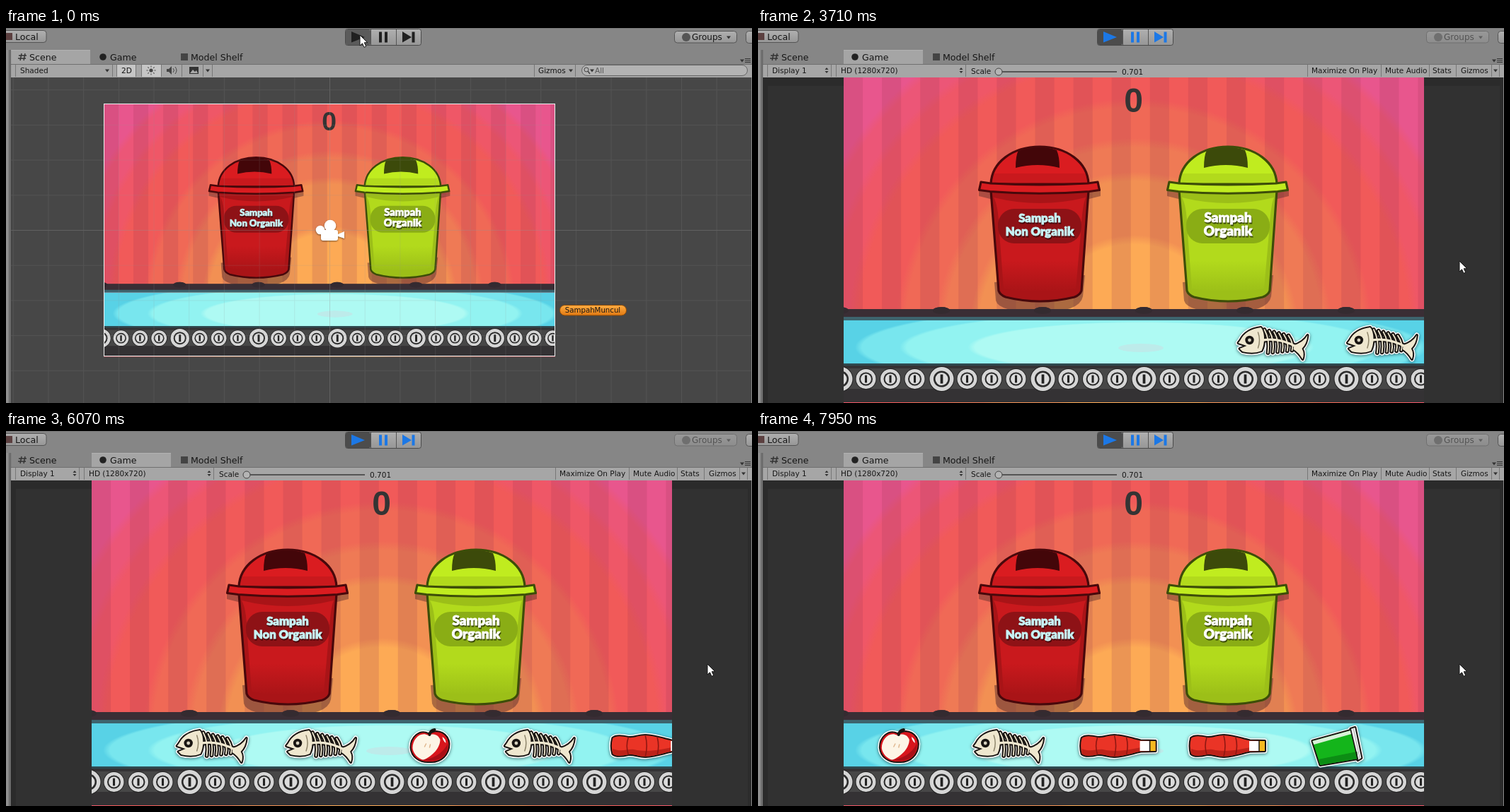
Write an HTML page that moves like this. It is 1054 px wide and 531 px high and loops after 8000 ms.

```html
<!DOCTYPE html>
<html lang="id">
<head>
<meta charset="utf-8">
<title>Sorting game in an editor</title>
<style>
  html, body { margin: 0; width: 100%; height: 100%; overflow: hidden; background: #868686; }
  svg { display: block; width: 1054px; height: 531px; }
  text { font-family: "DejaVu Sans", sans-serif; font-size: 10.5px; fill: #161616; white-space: pre; }
  .tab { font-size: 12.6px; }
  .label { font-family: Lato, sans-serif; font-weight: 900; text-anchor: middle; }
  .score { font: bold 48px "Liberation Sans", Arial, sans-serif; fill: #343434; text-anchor: middle; }
  .item { filter: drop-shadow(0 1px 2px rgba(0, 30, 40, .6)); }
</style>
</head>
<body>
<svg id="stage" viewBox="0 0 1054 531" xmlns="http://www.w3.org/2000/svg"></svg>
<script>
const rect = (x, y, w, h, fill, more = '') =>
  `<rect x="${x}" y="${y}" width="${w}" height="${h}" fill="${fill}" ${more}/>`;
const path = (d, fill, more = '') => `<path d="${d}" fill="${fill}" ${more}/>`;
const disc = (x, y, r, fill, more = '') => `<circle cx="${x}" cy="${y}" r="${r}" fill="${fill}" ${more}/>`;
const text = (x, y, s, more = '') => `<text x="${x}" y="${y}" ${more}>${s}</text>`;
const line = (d, color, w = 1) => path(d, 'none', `stroke="${color}" stroke-width="${w}"`);
const repeat = (n, f) => Array.from({ length: n }, (_, i) => f(i)).join('');

// Radial gradient in nearly flat rings
function rings(id, place, list) {
  let stops = '';
  list.forEach(([r, color], i) => {
    const from = i ? list[i - 1][0] + .012 : 0;
    stops += `<stop offset="${from}" stop-color="${color}"/><stop offset="${r - .012}" stop-color="${color}"/>`;
  });
  return `<radialGradient id="${id}" gradientUnits="userSpaceOnUse" cx="0" cy="0" r="1" gradientTransform="${place}">${stops}</radialGradient>`;
}

const fade = (id, ...colors) => `<linearGradient id="${id}" x2="0" y2="1">${colors.map((c, i) =>
  `<stop offset="${i / (colors.length - 1)}" stop-color="${c}"/>`).join('')}</linearGradient>`;

// ---- Game picture, in the coordinates of the large view ----

function bin(dx, c, label) {
  const body = 'M329 230 L340 372 Q342 378 350 381 Q398 393 447 381 Q455 378 457 372 L467 230Z';
  const dome = 'M329 221 C330 190 360 168 398 168 S466 190 467 221Z';
  const rim = 'M315 218 L329 220 Q398 224 466 220 L480 218 L482.500 229.500 L468 231.500 Q398 237 328 231.500 L312.500 229.500Z';
  const edge = `stroke="${c.edge}" stroke-width="3.2" stroke-linejoin="round"`;
  return `<g transform="translate(${dx} 0)">
    ${path('M334 360 L336 386 Q340 402 398 403 Q455 402 459 380 L462 350Z', '#5a2c2c', 'opacity=".5"')}
    ${path('M312 230 h172 v8 l-16 4 h-140 l-16 -4Z', '#5a2c2c', 'opacity=".45"')}
    ${path(body, c.dark)}
    ${path('M333 240 Q398 256 463 240 Q458 252 456 290 L449 369 Q398 379 347 369 L341 290 Q340 252 333 240Z', `url(#${c.name})`)}
    ${path(body, 'none', edge)}
    ${path(dome, c.lid)}
    ${path('M331 206 H465 L467 221 H329Z', c.body)}
    ${path('M364 198 Q364 181 368 173 Q398 164 422 173 Q426 182 426 198 Q395 190 364 198Z', c.slot)}
    ${path(dome, 'none', edge)}
    ${path(rim, c.lid, edge)}
    ${rect(339, 256, 118, 49, c.plate, 'rx="23"')}
    ${[[1, 2, c.edge], [0, 0, c.ink]].map(([x, y, fill]) => label.map((s, i) =>
      text(398 + x, 274.5 + i * 19.5 + y, s, `class="label" style="fill:${fill};font-size:${c.size}px" stroke="${fill}" stroke-width=".9"`)).join('')).join('')}
  </g>`;
}

const red = { name: 'red', edge: '#48080b', lid: '#da1c20', body: '#c9191d', dark: '#a91417', slot: '#430609', plate: '#8e1216', ink: '#c8f3f5', size: 16.7 };
const green = { name: 'green', edge: '#3d4d09', lid: '#c0ec1f', body: '#b2da1c', dark: '#9cbf18', slot: '#3c4a0a', plate: '#8aad15', ink: '#ffffff', size: 18.8 };

function roller(x, r) {
  return disc(x, 497, r + 1, '#232323') + disc(x, 497, r, '#d6d6d6') + disc(x, 497, r * .68, '#2c2c2c')
    + disc(x, 497, r * .53, '#dcdcdc') + rect(x - r * .11, 497 - r * .38, r * .22, r * .76, '#222');
}

const art = `<g id="art">
  ${rect(121, 70, 820, 461, 'url(#glow)')}
  ${repeat(16, i => rect(121 + i * 54.1, 70, Math.min(27.05, 820 - i * 54.1), 330, '#8c3050', 'opacity=".17"'))}
  ${text(530.7, 119.4, '0', 'class="score"')}
  ${repeat(6, i => `<ellipse cx="${116 + i * 143}" cy="400" rx="12" ry="5" fill="#362b32"/>`)}
  ${bin(0, red, ['Sampah', 'Non Organik'])}
  ${bin(266, green, ['Sampah', 'Organik'])}
  ${rect(121, 398, 820, 12, '#3a2e35')}
  ${repeat(6, i => `<ellipse cx="${116 + i * 143}" cy="400" rx="12" ry="5" fill="#332a30" opacity=".8"/>`)}
  ${rect(121, 409, 820, 5, '#3d646e')}
  ${rect(121, 414, 820, 62, 'url(#water)')}
  <ellipse cx="541" cy="453" rx="32" ry="6" fill="#bdebea"/>
  ${rect(121, 475, 820, 55, '#343234')}
  ${rect(121, 475, 820, 3, '#2f4a50')}
  ${rect(121, 482, 820, 29, '#474747')}
  ${repeat(6, i => roller(116.5 + i * 143, 17) + [36, 70.5, 105].map(d => roller(116.5 + i * 143 + d, 14)).join(''))}
</g>`;

// ---- Things on the belt, centred on 0,0 ----

// Each part is [d, stroke width, fill]; drawn as white rim, dark outline, then colour.
function sticker(id, parts, extra = '') {
  const pass = (grow, color) => parts.map(([d, w, solid]) =>
    path(d, solid ? color || solid : 'none', `stroke="${color || (solid ? 'none' : '#efe7cf')}" stroke-width="${w + grow}"`)).join('');
  return `<g id="${id}" stroke-linejoin="round" stroke-linecap="round">${pass(7, '#fff')}${pass(4, '#191512')}${pass(0, '')}${extra}</g>`;
}

const ribs = repeat(6, i => {
  const x = -9 + i * 6.8, h = 16 - i * 1.7;
  return `M${x - 3} ${-3 - h} Q${x + 5} ${-4 + i} ${x + 2} ${h - 2 + i}`;
});
const tail = 'M30 3 Q43 -1 49 -11 Q48 1 41 8 Q45 15 42 23 Q36 13 29 9Z';
const head = 'M-49 0 L-46 -4 C-41 -14 -32 -20 -17 -22 C-11 -16 -11 2 -16 11 C-25 15 -35 14 -43 12 L-47 8 L-37 4 Q-43 2 -49 0Z';
const bottle = 'M-51 -11 C-47 -15 -37 -14 -29 -12 C-21 -11 -15 -15 -5 -15 C11 -14 20 -10 32 -7.500 L53 -7 L53 7 L32 7.500 C20 10 11 14 -5 15 C-15 15 -21 11 -29 12 C-37 14 -47 15 -51 11 Q-54 0 -51 -11Z';

const goods = [
  sticker('fish', [[ribs, 1.8], ['M-14 -4 Q10 -8 34 6', 3.4], [tail, 0, '#efe7cf'], [head, 0, '#efe7cf']],
    disc(-33, -4, 6.2, '#191512') + disc(-33, -4, 2.4, '#d8d2c0') + line('M-21 -15 Q-17 -4 -21 7', '#8f866c', 1.5)),
  sticker('apple', [['M-3 -17 C-15 -23 -27 -12 -27 2 C-26 15 -15 23 -1 22 C15 23 26 12 26 -3 C25 -17 11 -23 2 -18Z', 0, '#d8161c']],
    path('M-3 -15 C-14 -21 -25 -10 -25 3 C-24 11 -18 17 -10 20 C4 14 14 2 14 -9 C11 -17 3 -18 -3 -15Z', '#fdf5e6')
    + path('M-14 20 Q14 18 25 -4 Q25 20 0 21Z', '#a90f16')
    + path('M17 -13 Q22 -10 22 -4 Q18 -7 17 -13Z', '#fff')
    + line('M-1 -16 Q0 -22 6 -23', '#191512', 4) + line('M-6 -3 l-2 4 M0 -2 l-1 4', '#e0b890', 1.5)),
  sticker('bottle', [[bottle, 0, '#ea3426']],
    path('M-51 4 C-39 9 -31 4 -21 5 C1 10 20 4 32 2 L32 7.500 C20 10 11 14 -5 15 C-15 15 -21 11 -29 12 C-37 14 -47 15 -51 11Z', '#bd2219')
    + line('M-29 -12 Q-33 0 -29 12 M-5 -15 Q-1 0 -5 15 M12 -12 Q15 0 12 12', '#8e1712', 1.6)
    + rect(31, -7, 14, 14, '#fff') + rect(45, -7, 8, 14, '#f5b91f') + line('M45 -7 V7', '#191512', 1.5)),
  sticker('cup', [['M-34 -7 L20 -22 L30 18 L-23 27Z', 0, '#14b51b'], ['M20 -24 L26 -26 L35 17 L30 20Z', 0, '#f2f2f2']],
    path('M-26 19 L29 8 L30 18 L-23 27Z', '#0c8d14') + path('M-34 -7 L20 -22 L21 -17 L-32 -2Z', '#d9f0d9')
    + line('M20 -23 L30 19', '#191512', 1.6) + line('M24 -24 L33 18', '#a9a9a9', 1))
].join('');

// ---- Editor window ----

const down = (x, y) => path(`M${x - 3} ${y - 1.5} h6 l-3 4Z`, '#333');
const upDown = x => path(`M${x - 2.5} 59 h5 l-2.500 -3Z M${x - 2.5} 61 h5 l-2.500 3Z`, '#333');
const bars = (xs, color = '#777') => xs.map(x => line(`M${x} 52 V69`, color)).join('');

function transport(color, pressed) {
  return rect(479.5, 1.5, 107, 23, 'url(#button)', 'rx="3" stroke="#4a4a4a"')
    + rect(480, 2, 35, 22, pressed, 'rx="2"') + line('M515.5 2 V24 M551.5 2 V24', '#555')
    + path('M488 5 L507 13 L488 20.500Z M527 5.500 h4 v15 h-4Z M535 5.500 h4 v15 h-4Z M560 5 L573 13 L560 20.500Z M573.500 5.500 h4 v15 h-4Z', color);
}

const tabs = x => rect(x, 31, 112, 20, '#a5a5a5') + line(`M${x} 31.500 h112`, '#b2b2b2');

const frame = rect(0, 0, 1054, 531, '#868686')
  + line('M0 .5 H1054', '#757575')
  + rect(-6, 3.5, 63, 17, 'url(#button)', 'rx="4" stroke="#555"') + rect(0, 7, 9, 10, '#5c4040')
  + text(13, 17, 'Local', 'class="tab"')
  + rect(1045.5, 4.5, 20, 17, 'url(#button)', 'rx="4" stroke="#555"')
  + rect(7, 51, 1047, 19, '#a6a6a6') + line('M7 51.500 H1054', '#707070');

const tabNames = line('M22 36 L20 46 M27 36 L25 46 M18 39 H29 M17 43 H28', '#333', 1.4) + text(33, 45.5, 'Scene', 'class="tab"')
  + disc(137, 41, 4.8, '#222') + text(147, 45.5, 'Game', 'class="tab"')
  + rect(247, 36, 10, 10, '#444') + text(261, 45.5, 'Model Shelf', 'class="tab"')
  + down(1040, 46) + line('M1044 43.500 h8 M1044 46 h8 M1044 48.500 h8', '#333');

const teamButton = `${rect(944.5, 4.5, 88, 16.5, 'url(#button)', 'rx="4" stroke="#555"')}
  ${disc(961, 13, 6, '#555')}${text(969, 17, 'Groups', 'style="font-size:12px"')}${down(1021, 13)}`;

const sceneView = `<g id="scene">
  ${tabs(7)}${transport('#202020', '#5b5b5b')}${teamButton}
  ${text(20, 64, 'Shaded')}${down(143, 60)}
  ${rect(157, 52, 26, 17, '#c6c6c6')}${text(163, 64, '2D')}
  ${rect(192, 52, 27, 17, '#c6c6c6')}${disc(205, 60, 2.6, '#444')}
  ${repeat(8, i => `<path d="M205 55.500 v-2" stroke="#444" transform="rotate(${i * 45} 205 60)"/>`)}
  ${path('M227 58 h3 l4 -4 v12 l-4 -4 h-3Z', '#444')}${line('M236 57 q3 3 0 6 M239 55 q4 5 0 10', '#444')}
  ${rect(259, 55, 13, 10, '#333')}${path('M260 64 l4 -5 3 3 2 -2 2 4Z', '#aaa')}${down(285, 60)}
  ${bars([13.5, 150.5, 156.5, 183.5, 191.5, 219.5, 248.5, 278.5, 291.5, 746.5, 804.5])}
  ${text(752, 64, 'Gizmos')}${down(798, 60)}
  ${rect(813.5, 52.5, 234, 15, '#b3b3b3', 'rx="7.5" stroke="#666"')}
  ${disc(820, 59, 3, 'none', 'stroke="#444"')}${line('M822 61 l3 4', '#444', 1.4)}${down(828, 60)}
  ${text(832, 63.5, 'All', 'style="fill:#555"')}
  ${rect(7, 70, 1046, 461, '#474747')}
  <use href="#art" clip-path="url(#field)" transform="translate(138 107) scale(.778) translate(-121 -70)"/>
  ${rect(7, 70, 1046, 461, 'url(#grid)')}
  ${line('M457.500 70 V531 M7 286.500 H1053', 'rgba(150,150,150,.2)')}
  ${rect(138.5, 107.5, 637, 357, 'none', 'stroke="#f0f0f0"')}
  <g style="filter:drop-shadow(0 1px 1px rgba(0,0,0,.5))">
    ${disc(458, 280, 8.3, '#fff')}${disc(444, 286, 6.3, '#fff')}
    ${rect(445, 286, 24, 15, '#fff', 'rx="3"')}${path('M469 292 L478 288 V298 L469 295Z', '#fff')}
  </g>
  ${rect(782.5, 392.5, 94, 14.5, 'url(#orange)', 'rx="7" stroke="#8a4a08"')}
  ${text(829, 403, 'SampahMuncul', 'text-anchor="middle" style="font-size:10.2px"')}
</g>`;

const gameView = `<g id="game">
  ${tabs(121)}${transport('#1c78e6', '#4c4c4c')}<g opacity=".45">${teamButton}</g>
  ${text(20, 64, 'Display 1')}${upDown(97)}
  ${text(117, 64, 'HD (1280x720)')}${upDown(287)}
  ${text(301, 65, 'Scale')}${line('M335 62 H507', '#555', 2)}${disc(340, 62, 5, '#b5b5b5', 'stroke="#444"')}
  ${text(514, 65.5, '0.701')}
  ${text(782, 64, 'Maximize On Play')}${text(886, 64, 'Mute Audio')}
  ${text(953, 64, 'Stats')}${text(993, 64, 'Gizmos')}${down(1042, 60)}
  ${bars([13.5, 103.5, 110.5, 293.5, 776.5, 880.5, 948.5, 986.5, 1036.5, 1047.5])}
  ${rect(7, 70, 1046, 461, '#2b2b2b')}${rect(14, 82, 1034, 449, '#313131')}
  <g clip-path="url(#field)"><use href="#art"/><g id="belt"></g></g>
</g>`;

const stage = document.getElementById('stage');
stage.innerHTML = `<defs>
  ${rings('glow', 'translate(531 437) scale(560)', [[.245, '#fdaa55'], [.405, '#f29053'], [.49, '#ef7a55'], [.59, '#f06956'], [.71, '#f15a59'], [.78, '#ef5767'], [.85, '#ec5677'], [1.1, '#e8568d']])}
  ${rings('water', 'translate(541 452) scale(420 62)', [[.57, '#aefaf3'], [.8, '#92f3f1'], [.95, '#78e6ee'], [1.1, '#58d2e6']])}
  ${fade('button', '#b0b0b0', '#969696')}${fade('orange', '#ffac42', '#e27a12')}
  ${[red, green].map(c => fade(c.name, c.body, c.body, c.body, c.dark)).join('')}
  <clipPath id="field"><rect x="121" y="70" width="820" height="461"/></clipPath>
  <pattern id="grid" x="457" y="286" width="49.7" height="49.7" patternUnits="userSpaceOnUse">
    ${line('M.5 0 V50 M0 .5 H50', 'rgba(140,140,140,.17)')}</pattern>
  ${art}${goods}
</defs>
${frame}${sceneView}${gameView}${tabNames}
${rect(0, 31, 4, 500, '#8f8f8f')}${line('M4.500 31 V531', '#5a5a5a')}${line('M6.500 31 V531', '#5a5a5a')}
${path('M0 0 V15 L3.500 11.800 L6 17.300 L8.700 16.100 L6.300 10.700 H10.800Z', '#fff', 'id="cursor" stroke="#161616"')}`;

// ---- Motion ----

const [scene, game, belt, cursor] = ['scene', 'game', 'belt', 'cursor'].map(id => document.getElementById(id));
const queue = ['fish', 'fish', 'apple', 'fish', 'bottle', 'bottle', 'cup'];
belt.innerHTML = queue.map((kind, i) => `<use href="#${kind}" class="item" x="${i * 154.4}"/>`).join('');

const ticks = [[0, -1], [689, -1], [690, 0], [1500, 6], [1770, 8], [2880, 16], [3000, 17], [3990, 24], [4410, 27],
  [5110, 32], [5390, 34], [6210, 40], [6630, 43], [7290, 48], [7950, 53], [8100, 54]];
// Centre of the first thing on the belt: [tick, x]
const travel = [[4, 1211], [17, 862], [27, 593], [34, 400], [43, 154], [53, -109]];
const mouseX = [[-1, 500], [6, 719], [8, 719], [14, 991]];
const mouseY = [[-1, 10], [6, 162], [8, 162], [14, 330]];

function along(points, t) {
  if (t <= points[0][0]) return points[0][1];
  for (let i = 1; i < points.length; i++) {
    const [a, u] = points[i - 1], [b, v] = points[i];
    if (t <= b) return u + (v - u) * (t - a) / (b - a);
  }
  return points[points.length - 1][1];
}

const start = performance.now();
function draw() {
  const ms = (performance.now() - start) % 8000;
  const tick = Math.floor(along(ticks, ms) + 1e-6);
  const playing = tick >= 4;
  scene.style.display = playing ? 'none' : '';
  game.style.display = playing ? '' : 'none';
  belt.setAttribute('transform', `translate(${along(travel, tick)} 446)`);
  cursor.setAttribute('transform', `translate(${along(mouseX, tick)} ${along(mouseY, tick)})`);
  requestAnimationFrame(draw);
}
draw();
</script>
</body>
</html>
```
